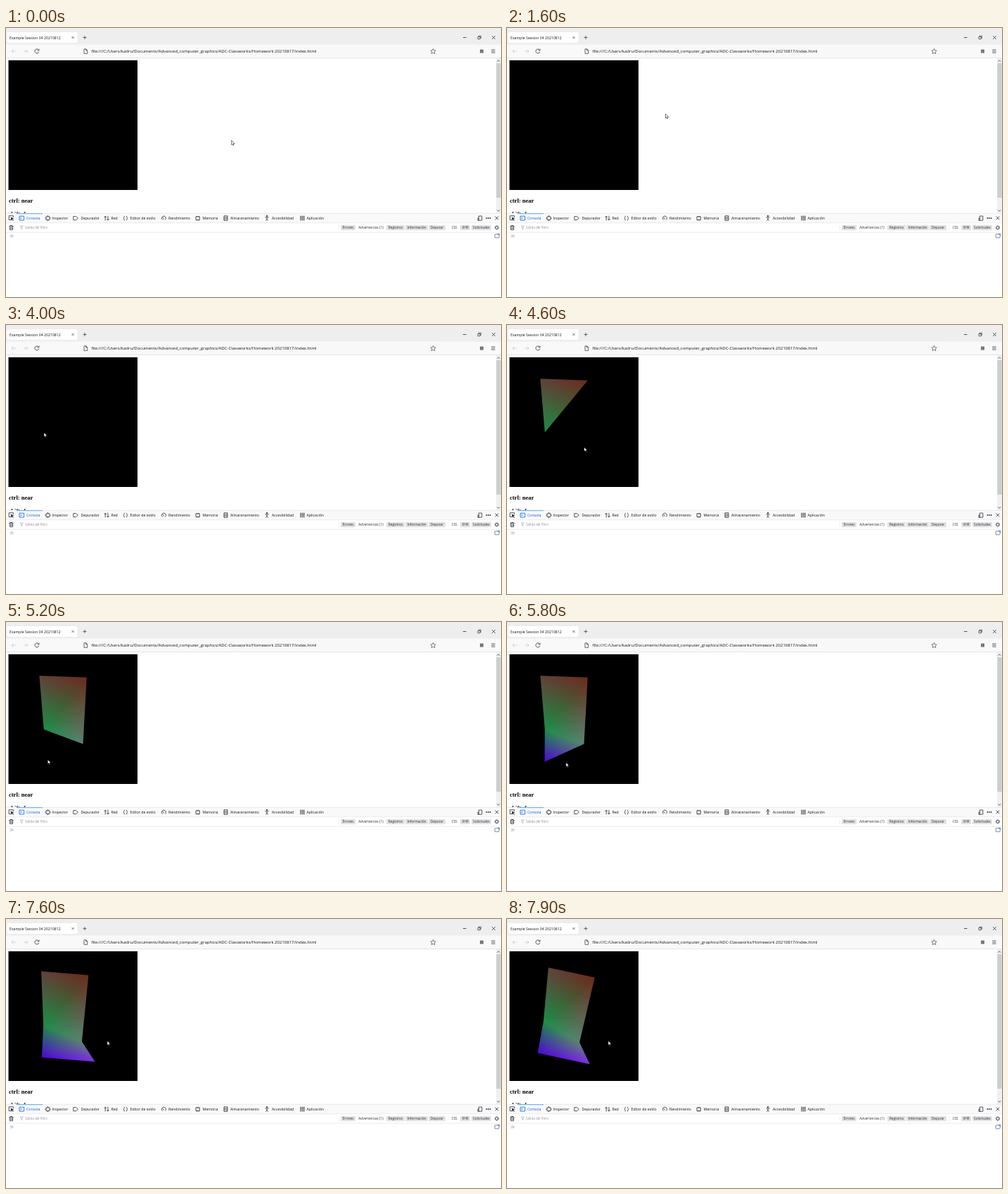
Recreate the animation shown at these times as an HTML page with a canvas. Size 704 px wide and 382 px high, loop 8 s.

```html
<!DOCTYPE html>
<html lang="es">
<head>
<meta charset="utf-8">
<title>Example Session 04 20210812</title>
<style>
  html, body { margin: 0; width: 100%; height: 100%; overflow: hidden; background: #fff; }
  svg, canvas { position: absolute; left: 0; top: 0; display: block; }
  text { font-family: "Open Sans", "Noto Sans", sans-serif; fill: #15141a; }
  .tab { font-size: 5.2px; }
  .url { font-size: 6px; }
  .chip { font-size: 4.75px; fill: #2b2a33; }
  .hint { font-size: 4.6px; fill: #8f8f9d; }
  .page { font: bold 8.5px "Liberation Serif", "Noto Serif", serif; fill: #000; }
  .active { fill: #0060df; }
  .ico { fill: none; stroke: #2b2a33; stroke-width: .8; }
  .off { stroke: #c8c8cd; }
  .blue { stroke: #0060df; }
  .solid { fill: #2b2a33; stroke: none; }
</style>
</head>
<body>
<svg width="704" height="382" viewBox="0 0 704 382">
  <!-- window frame -->
  <rect width="704" height="24" fill="#eeeeef"/>
  <rect x="1" y="5.5" width="101" height="16" rx="2" fill="#fff" stroke="#e2e2e6" stroke-width=".5"/>
  <text class="tab" x="5" y="15.6">Example Session 04 20210812</text>
  <g class="ico">
    <path d="M93.5 12l3 3m0-3l-3 3" stroke-width=".6"/>
    <path d="M109.5 13.5h5m-2.5-2.5v5" stroke-width=".7"/>
    <path d="M650 13.5h4.5"/>
    <path d="M671 12.5h3.2v3.2h-3.2zM672.2 12.3v-1.1h3.2v3.2h-1" stroke-width=".7"/>
    <path d="M691.2 11.2l4.6 4.6m0-4.6l-4.6 4.6"/>
  </g>

  <!-- address bar -->
  <rect y="23.5" width="704" height="19" fill="#f9f9fa"/>
  <rect x="107" y="25" width="509" height="16" rx="2" fill="#f8f8f9"/>
  <rect y="42" width="704" height=".7" fill="#dcdce0"/>
  <g class="ico">
    <path class="off" d="M14 33H8m2.6-2.6L8 33l2.6 2.6M25 33h6m-2.6-2.6L31 33l-2.6 2.6"/>
    <path d="M46.4 31.2a3 3 0 1 0 .4 2.6M47 29.7v2.2h-2.2"/>
    <path d="M111 29.8h2.9l1.8 1.8v4.7H111zM113.7 29.8v2h2" stroke-width=".7"/>
    <path d="M607.5 29.4l1.1 2.4 2.6.3-1.9 1.8.5 2.6-2.3-1.3-2.3 1.3.5-2.6-1.9-1.8 2.6-.3z" stroke-width=".6"/>
    <path d="M690.2 30.9h5.4m-5.4 2.1h5.4m-5.4 2.1h5.4" stroke-width=".7"/>
  </g>
  <rect x="674" y="30.5" width="5" height="5" fill="#77777f"/>
  <text class="url" x="121.5" y="35.4">file:///C:/Users/kadru/Documents/Advanced_computer_graphics/ADC-Classworks/Homework 20210817/index.html</text>

  <!-- page -->
  <text class="page" x="4" y="248">ctrl: near</text>
  <text class="page" x="4" y="267.3">shift: far</text>
  <rect x="697" y="43" width="7" height="220" fill="#f0f0f0"/>
  <rect x="697.3" y="50" width="6.4" height="191" fill="#ccd0cd"/>
  <path class="ico" d="M698.6 47.6l1.8-1.8 1.8 1.8M698.6 258.4l1.8 1.8 1.8-1.8"/>

  <!-- developer tools -->
  <rect y="263" width="704" height="119" fill="#fff"/>
  <rect y="263" width="704" height="13.5" fill="#f9f9fa"/>
  <path d="M0 263.2h704M0 276.7h704M0 290.2h704" stroke="#e0e0e2" stroke-width=".6"/>
  <rect x="15" y="263.3" width="37" height=".8" fill="#3a96f5"/>
  <g id="tabs"></g>
  <g class="ico">
    <path d="M8 272.5H4.2v-5.8h6.2v2.2"/><path class="solid" d="M6.6 268.5l4.6 2-2 .7 1.6 1.8-.8.7-1.5-1.8-.9 1.6z"/>
    <path class="blue" d="M19 267.2h6.6v5.8H19zM20.6 268.8l1.2 1.3-1.2 1.3"/>
    <path d="M57 267.8h5v4.6h-5zM59.5 266v1.8m0 4.6v1.8M55.4 270.1H57m5 0h1.6"/>
    <path d="M95.8 267.6h3.8l2.8 2.5-2.8 2.5h-3.8z"/>
    <path d="M141.2 273.3v-6m-1.6 1.7l1.6-1.8 1.6 1.8M145 266.8v6m-1.6-1.6l1.6 1.8 1.6-1.8"/>
    <path d="M168.8 267c-1.4 0-.2 2.6-1.8 3.1 1.6.5.4 3.1 1.8 3.1m2.2-6.2c1.4 0 .2 2.6 1.8 3.1-1.6.5-.4 3.1-1.8 3.1"/>
    <path d="M222.4 272.4a3 3 0 1 1 4 0M224.4 271.6l-1.4-2.6"/>
    <path d="M270 268h5.4v4.4H270zM271.2 268v-1m1.6 1v-1m1.6 1v-1m-3.2 5.4v1m1.6-1v1m1.6-1v1"/>
    <path d="M310 266.8h5v6.5h-5zM310 269h5m-5 2.1h5"/>
    <path d="M368.5 268.8l2.6.6 2.6-.6m-2.6.6v1.8l-1.4 2.4m1.4-2.4l1.4 2.4"/><circle class="solid" cx="371.1" cy="267.2" r="1.1"/>
    <path d="M418.5 267h1.5v1.5h-1.5zm2.4 0h1.5v1.5h-1.5zm2.4 0h1.2v1.5h-1.2zm-4.8 2.4h1.5v1.5h-1.5zm2.4 0h1.5v1.5h-1.5zm2.4 0h1.2v1.5h-1.2zm-4.8 2.4h1.5v1.2h-1.5zm2.4 0h1.5v1.2h-1.5zm2.4 0h1.2v1.2h-1.2z" stroke-width=".5"/>
    <path d="M672.4 267h4.4v6.2h-4.4zM672.4 270h-1.4v3.2h2"/>
    <path d="M695.6 267.5l4.8 4.8m0-4.8l-4.8 4.8"/>
    <path d="M4.6 281.4h5.8m-4.1 0v-1h2.4v1m-3.5 0l.3 5.2h4l.3-5.2m-2.9 1.4v2.5m1.4-2.5v2.5"/>
    <path d="M20 281h4.4l-1.6 2v2.6l-1.2-.8V283z" stroke="#8f8f9d" stroke-width=".5"/>
    <circle cx="698" cy="283.5" r="1.9"/><circle cx="698" cy="283.5" r="2.8" stroke-dasharray="1.1 1.1"/>
    <path d="M6 293.3l1.9 2-1.9 2m2.3-4l1.9 2-1.9 2" stroke="#77777f" stroke-width=".7"/>
    <rect x="695.2" y="292.8" width="6" height="5" rx=".8" stroke="#3d5a80" stroke-width=".7"/>
    <path class="blue" d="M699.2 292.4h2.4v2"/>
  </g>
  <g class="solid"><circle cx="683.4" cy="270" r=".9"/><circle cx="686" cy="270" r=".9"/><circle cx="688.6" cy="270" r=".9"/></g>
  <text class="hint" x="27" y="285.2">Salida del filtro</text>
  <path d="M473.5 279.5v8M629 279.5v8" stroke="#dcdce0" stroke-width=".5"/>
  <g id="chips"></g>
</svg>
<canvas id="scene" width="188" height="231"></canvas>
<svg width="704" height="382">
  <path id="pointer" d="M0 0v6.2l1.4-1.3 1 2.1.9-.4-.9-2h2z" fill="#fff" stroke="#000" stroke-width=".55"/>
</svg>
<script>
const LOOP = 8000, STEP = 100;
const byId = id => document.getElementById(id);

const tabs = [["Consola", 29], ["Inspector", 65.5], ["Depurador", 106.5], ["Red", 149.5],
  ["Editor de estilo", 176.5], ["Rendimiento", 231], ["Memoria", 279.5],
  ["Almacenamiento", 319], ["Accesibilidad", 378], ["Aplicación", 427.5]];
byId("tabs").innerHTML = tabs.map(([label, x], i) =>
  `<text class="tab${i ? "" : " active"}" x="${x}" y="272">${label}</text>`).join("");

// label, left, right, pressed
const chips = [["Errores", 476, 497, 1], ["Advertencias (1)", 499, 539, 0], ["Registros", 541, 567, 1],
  ["Información", 568, 600, 1], ["Depurar", 601, 625, 1], ["CSS", 631, 644, 0],
  ["XHR", 646, 660, 1], ["Solicitudes", 662, 690, 1]];
byId("chips").innerHTML = chips.map(([label, l, r, on]) =>
  (on ? `<rect x="${l}" y="279.7" width="${r - l}" height="7.6" rx="1" fill="#e2e2e4"/>` : "") +
  `<text class="chip" x="${(l + r) / 2}" y="285.2" text-anchor="middle">${label}</text>`).join("");

// pointer path: time, x, y
const path = [[0, 320.7, 159.7], [1500, 320.7, 159.7], [1700, 130, 84], [1800, 40, 61], [1900, 3, 57],
  [2000, 3, 57], [2300, 71, 69], [2500, 52, 71.5], [2900, 47.5, 76.5], [3100, 47.5, 76.5],
  [3500, 114.5, 78.5], [3600, 114.5, 78.5], [3950, 54, 152.7], [4200, 54, 152.7],
  [4500, 109.7, 173.4], [4700, 109.7, 173.4], [5200, 59.3, 195.4], [5400, 53.5, 198.3],
  [5600, 53.5, 198.3], [6100, 129.4, 201.2], [6600, 129.4, 201.2], [7000, 144, 173], [LOOP, 144, 173]];

function pointerAt(t) {
  const i = path.findIndex(k => k[0] > t);
  const [t0, x0, y0] = path[i - 1], [t1, x1, y1] = path[i];
  const k = (t - t0) / (t1 - t0);
  return [x0 + (x1 - x0) * k, y0 + (y1 - y0) * k];
}

const points = [[47.4, 76.3], [114.8, 78.8], [53.8, 152.6], [109.5, 173.3], [53.5, 198.4], [129.3, 201.3]];
const colors = ["#60413a", "#6c2a1e", "#1d8c48", "#5b8270", "#4a08d2", "#7c30e2"];
const shownAt = [4200, 4800, 5600, 6300];
const center = [95.3, 137.8];
const ctx = byId("scene").getContext("2d");

function spin([x, y], angle) {
  const dx = x - center[0], dy = y - center[1], c = Math.cos(angle), s = Math.sin(angle);
  return [center[0] + dx * c - dy * s, center[1] + dx * s + dy * c];
}

// Each corner's colour fades to black at the opposite edge; the three layers add up.
function shade(tri, tint) {
  ctx.beginPath();
  tri.forEach(p => ctx.lineTo(...p));
  ctx.closePath();
  tri.forEach((p, i) => {
    const a = tri[(i + 1) % 3], b = tri[(i + 2) % 3];
    const ex = b[0] - a[0], ey = b[1] - a[1];
    const k = ((p[0] - a[0]) * ex + (p[1] - a[1]) * ey) / (ex * ex + ey * ey);
    const fade = ctx.createLinearGradient(a[0] + ex * k, a[1] + ey * k, ...p);
    fade.addColorStop(0, "#000");
    fade.addColorStop(1, tint[i]);
    ctx.fillStyle = fade;
    ctx.fill();
  });
}

function drawScene(t) {
  const angle = Math.max(0, Math.floor((t - 7500) / STEP)) * 2.5 * Math.PI / 180;
  const pts = points.map(p => spin(p, angle));
  ctx.globalCompositeOperation = "source-over";
  ctx.clearRect(0, 0, 188, 231);
  ctx.fillStyle = "#000";
  ctx.fillRect(3.5, 45.8, 183.5, 184.2);
  ctx.globalCompositeOperation = "lighter";
  shownAt.forEach((start, i) => {
    if (t >= start) shade(pts.slice(i, i + 3), colors.slice(i, i + 3));
  });
}

function frame() {
  const t = Math.floor(performance.now() % LOOP / STEP) * STEP;
  drawScene(t);
  byId("pointer").setAttribute("transform", `translate(${pointerAt(t)})`);
  requestAnimationFrame(frame);
}
frame();
</script>
</body>
</html>
```
